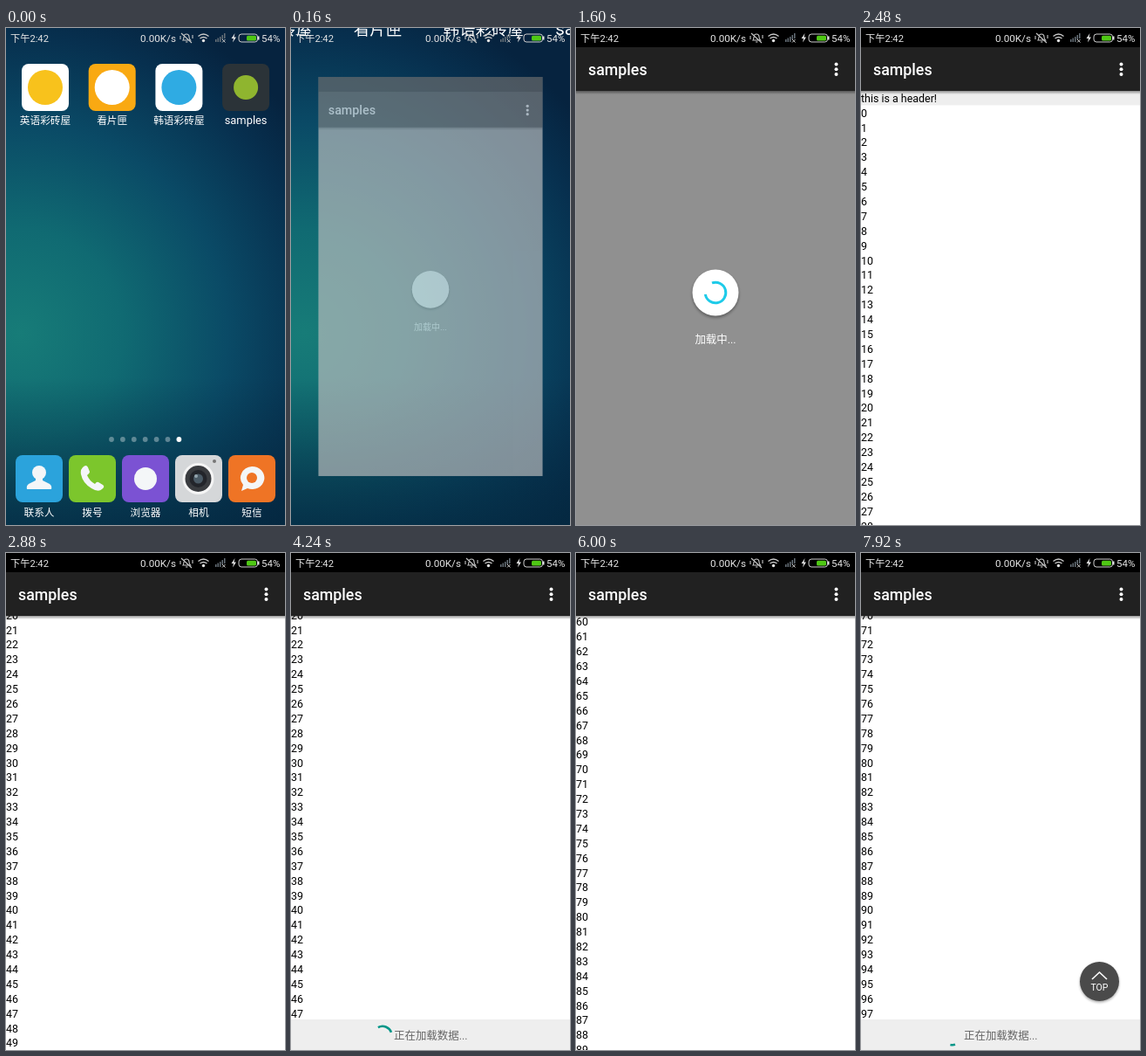
Recreate the animation shown at these times as an HTML page. Size 320 px wide and 569 px high, loop 8000 ms.

```html
<!DOCTYPE html>
<html lang="zh">
<head>
<meta charset="utf-8">
<title>samples</title>
<style>
html, body { margin: 0; width: 100%; height: 100%; overflow: hidden; background: #000; }
svg { display: block; width: 100%; height: 100%; }
text { font-family: Roboto, 'Noto Sans CJK SC', 'Noto Sans CJK', sans-serif; font-size: 12.44px; white-space: pre; }
.mid { text-anchor: middle; }
.label { fill: #fff; font-size: 11.7px; text-anchor: middle; }
.arc { fill: none; }
</style>
</head>
<body>
<svg viewBox="0 0 320 569" xmlns="http://www.w3.org/2000/svg">
  <defs>
    <radialGradient id="wall" gradientUnits="userSpaceOnUse" cx="15" cy="350" r="400">
      <stop offset="0" stop-color="#177c78"/>
      <stop offset=".3" stop-color="#106a72"/>
      <stop offset=".6" stop-color="#0a4a66"/>
      <stop offset=".85" stop-color="#07304f"/>
      <stop offset="1" stop-color="#06233f"/>
    </radialGradient>
    <linearGradient id="low" x1="0" y1="0" x2="0" y2="1">
      <stop offset="0" stop-color="#04283f" stop-opacity="0"/>
      <stop offset="1" stop-color="#04283f" stop-opacity=".75"/>
    </linearGradient>
    <linearGradient id="drop" x1="0" y1="0" x2="0" y2="1">
      <stop offset="0" stop-opacity=".4"/>
      <stop offset="1" stop-opacity="0"/>
    </linearGradient>
    <filter id="soft" x="-30%" y="-30%" width="160%" height="160%"><feGaussianBlur stdDeviation="1.5"/></filter>
  </defs>

  <g id="desk">
    <rect width="320" height="569" fill="url(#wall)"/>
    <rect y="400" width="320" height="169" fill="url(#low)"/>
    <g id="home">
      <g id="apps"></g>
      <g id="dots"></g>
      <g fill="#f4f6f8">
        <circle cx="38" cy="509" r="8"/>
        <path d="M34 513h8v5l8 4q3 2 2 6H24q-1-4 2-6l8-4z"/>
        <path d="M88 503q4-4 6 0l2 5q0 2-3 4q3 7 9 10q2-3 4-2l5 3q3 2-1 5q-4 4-12-1q-10-6-12-16q-1-5 2-8z"/>
        <circle cx="160" cy="516" r="13"/>
        <circle cx="220.500" cy="516" r="18" fill="#f5f5f5"/>
        <circle cx="220.500" cy="516" r="15" fill="#3a3c40"/>
        <circle cx="220.500" cy="516" r="10" fill="#23252b"/>
        <circle cx="220.500" cy="516" r="5.500" fill="#4a5a66"/>
        <circle cx="218" cy="513" r="2" fill="#93a4ae"/>
        <circle cx="239" cy="496" r="2" fill="#777"/>
        <path d="M282 502a14 13 0 1 1-5 25l-7 3l2-7a14 13 0 0 1 10-21z"/>
        <circle cx="282" cy="515" r="6" fill="#ef7425"/>
      </g>
    </g>
  </g>

  <rect id="flash" width="320" height="569" fill="#fff"/>
  <g id="app">
    <g id="load">
      <rect width="320" height="569" fill="#909090"/>
      <circle cx="160" cy="305" r="27" fill="#000" opacity=".3" filter="url(#soft)"/>
      <circle cx="160" cy="303" r="26.500" fill="#fff"/>
      <path id="ring" class="arc" stroke="#1ecbe9" stroke-width="3"/>
      <text class="mid" x="160" y="361" fill="#fff">加载中...</text>
    </g>
    <g id="list">
      <rect width="320" height="569" fill="#fff"/>
      <g id="rows"></g>
      <g id="foot">
        <rect y="534" width="320" height="35" fill="#eee"/>
        <path id="spin" class="arc" stroke="#009688" stroke-width="2.600"/>
        <text x="118" y="556.500" fill="#666">正在加载数据...</text>
      </g>
      <g id="top">
        <circle cx="273.500" cy="492" r="22.500" fill="#000" opacity=".35" filter="url(#soft)"/>
        <circle cx="273.500" cy="490.500" r="22.500" fill="#4a4a4a"/>
        <path class="arc" d="M265 488l8.500-8l8.500 8" stroke="#fff" stroke-width="1.600"/>
        <text class="mid" x="273.500" y="500.800" fill="#fff" style="font-size:10.500px">TOP</text>
      </g>
    </g>
    <rect y="72" width="320" height="4" fill="url(#drop)"/>
    <rect y="22" width="320" height="50" fill="#212121"/>
    <rect width="320" height="22" fill="#000"/>
    <text x="14" y="54" fill="#fff" style="font-size:17.800px;font-weight:500">samples</text>
    <g fill="#fff">
      <circle cx="298.500" cy="41.500" r="2"/><circle cx="298.500" cy="47.300" r="2"/><circle cx="298.500" cy="53.100" r="2"/>
    </g>
  </g>

  <g id="status" fill="#e4e4e4">
    <text x="5" y="15.500" style="font-size:11.200px">下午2:42</text>
    <text x="154" y="15.500" style="font-size:11.700px">0.00K/s</text>
    <g fill="none" stroke="#c8c8c8" stroke-width="1.100">
      <path d="M203 14h8.500q-1.500-1.500-1.500-4q0-3-3-3t-3 3q0 2.500-1 4zM206 16h2.500M201 6l12 11M200 9v4M214 8v4"/>
      <path d="M220.500 9.500q6-5 12 0M222.500 12q4-3 8 0" stroke-width="1.400"/>
    </g>
    <circle cx="226.500" cy="14.500" r="1.700"/>
    <path d="M240 13h1.500v3h-1.500zM242.500 11.500h1.500v4.500h-1.500zM245 10h1.500v6h-1.500zM247.500 8h1.500v5h-1.500zM250 6h1.500v6h-1.500z" fill="#667078"/>
    <path d="M248 13l3.500 3.500M251.500 13l-3.500 3.500" stroke="#ccc"/>
    <path d="M262.500 6l-4 6h2.500l-1 4.500l4-6h-2.500z"/>
    <rect x="267" y="7" width="21.500" height="9" rx="3" fill="none" stroke="#ccc"/>
    <rect x="289" y="9.500" width="1.500" height="4"/>
    <rect x="276" y="8.700" width="11" height="5.800" rx="1.500" fill="#4fc814"/>
    <text x="293" y="15.500" style="font-size:11.500px">54%</text>
  </g>
</svg>
<script>
const LOOP = 8000, STEP = 80, ROW = 16.889;
const $ = id => document.getElementById(id);

function add(parent, tag, attrs, text) {
  const el = document.createElementNS('http://www.w3.org/2000/svg', tag);
  for (const k in attrs) el.setAttribute(k, attrs[k]);
  if (text) el.textContent = text;
  return parent.appendChild(el);
}

const tile = (x, y, fill) => add($('apps'), 'rect', { x, y, width: 54, height: 54, rx: 8, fill });
const label = (x, y, name) => add($('apps'), 'text', { x, y, class: 'label' }, name);

[['英语彩砖屋', '#fff', '#f8c21c'], ['看片匣', '#f9a912', '#fff'],
 ['韩语彩砖屋', '#fff', '#2fabe3'], ['samples', '#2b3338', '#8fb52f']].forEach(([name, bg, mark], i) => {
  const x = 18 + i * 76.7;
  tile(x, 41, bg);
  add($('apps'), 'circle', { cx: x + 27, cy: 68, r: i === 3 ? 14 : 20, fill: mark });
  const t = label(x + 27, 109.500, name);
  if (i === 3) t.style.fontSize = '12.900px';
});

[['联系人', '#2ba3dc'], ['拨号', '#7cc62c'], ['浏览器', '#7b52d3'],
 ['相机', '#d5d7d9'], ['短信', '#ef7425']].forEach(([name, bg], i) => {
  tile(11 + i * 61, 489, bg);
  label(38 + i * 61, 558.500, name);
});

for (let i = 0; i < 7; i++)
  add($('dots'), 'circle', { cx: 121 + i * 12.9, cy: 471, r: 2.9, fill: '#fff', opacity: i === 6 ? 1 : .35 });

const head = add($('rows'), 'g', {});
add(head, 'rect', { width: 320, height: ROW, fill: '#eee' });
add(head, 'text', { y: 13.3 }, 'this is a header!');
const rows = Array.from({ length: 32 }, () => add($('rows'), 'text', { x: 0 }));

// Time/value pairs with straight lines between them
function track(keys, t) {
  if (t <= keys[0][0]) return keys[0][1];
  for (let i = 1; i < keys.length; i++) {
    const [a, u] = keys[i - 1], [b, v] = keys[i];
    if (t <= b) return u + (v - u) * (t - a) / (b - a);
  }
  return keys[keys.length - 1][1];
}

const END1 = 569 - 50 * ROW, END2 = 569 - 100 * ROW;
const scroll = [[2400, 88.8], [2480, 88.4], [2560, 55], [2640, -45], [2720, -145], [2800, -228], [2880, END1],
  [4960, END1], [5040, -310], [5200, -370], [5440, -370], [5600, -480], [6000, -943.2], [6160, -1065], [6320, END2]];
const zoom = [[0, .45], [160, .803], [240, .94], [320, 1]];
const deskZoom = [[0, 1], [160, 1.58], [240, 1.8]];
const white = [[0, 0], [160, .46], [320, 1]];
const fade = [[0, 0], [160, .37], [240, .8], [320, 1]];
const button = [[4960, 0], [5120, 1], [5440, 1], [5600, 0], [6720, 0], [6960, 1]];

// cubic-bezier(.4, 0, .2, 1)
function ease(x) {
  if (x <= 0) return 0;
  if (x >= 1) return 1;
  let lo = 0, hi = 1, u;
  for (let i = 0; i < 18; i++) {
    u = (lo + hi) / 2;
    const v = 1 - u;
    if (1.2 * v * v * u + .6 * v * u * u + u ** 3 < x) lo = u; else hi = u;
  }
  return u * u * (3 - 2 * u);
}

// Material spinner: the tip runs ahead, then the tail catches up
function spinner(el, cx, cy, r, dt, turn) {
  const c = dt / 1333, n = Math.floor(c), p = c - n;
  const tail = .75 * ease(2 * p - 1), tip = .75 * ease(2 * p) + .03;
  const base = (turn - 90 + .162 * dt) / 360 + n + p / 4;
  const at = k => {
    const a = (base + k) * 2 * Math.PI;
    return (cx + r * Math.cos(a)).toFixed(2) + ' ' + (cy + r * Math.sin(a)).toFixed(2);
  };
  el.setAttribute('d', `M${at(tail)}A${r} ${r} 0 ${tip - tail > .5 ? 1 : 0} 1 ${at(tip)}`);
}

const show = (id, on) => $(id).style.display = on ? '' : 'none';
const scaled = (id, s) => $(id).setAttribute('transform', `translate(160 284.5) scale(${s}) translate(-160 -284.5)`);

function drawList(t) {
  const y0 = track(scroll, t), count = t < 4960 ? 50 : 100;
  const first = Math.max(0, Math.floor((60 - y0) / ROW));
  head.setAttribute('transform', `translate(0 ${y0 - ROW})`);
  rows.forEach((el, i) => {
    const k = first + i;
    el.textContent = k < count ? k : '';
    el.setAttribute('y', (y0 + k * ROW + 13.3).toFixed(2));
  });
  const second = t >= 6800;
  show('foot', second || (t >= 3520 && t < 4960));
  spinner($('spin'), 105, 552.5, 10.7, t - (second ? 6800 : 3284), second ? 16 : -71);
  $('top').setAttribute('opacity', track(button, t));
}

function draw(t) {
  const open = t >= 80, listed = t >= 1680;
  show('desk', t < 320);
  show('flash', open);
  show('app', open);
  show('load', !listed);
  show('list', listed);
  scaled('home', track(deskZoom, t));
  scaled('app', track(zoom, t));
  scaled('flash', track(zoom, t));
  $('flash').setAttribute('opacity', track(white, t));
  $('app').setAttribute('opacity', track(fade, t));
  if (listed) drawList(t);
  else {
    show('ring', t > 160);
    spinner($('ring'), 160, 303, 11.8, t + 400, -29);
  }
}

const begin = performance.now();
function tick() {
  const t = (performance.now() - begin) % LOOP;
  draw(Math.floor(t / STEP) * STEP);
  requestAnimationFrame(tick);
}
tick();
</script>
</body>
</html>
```
